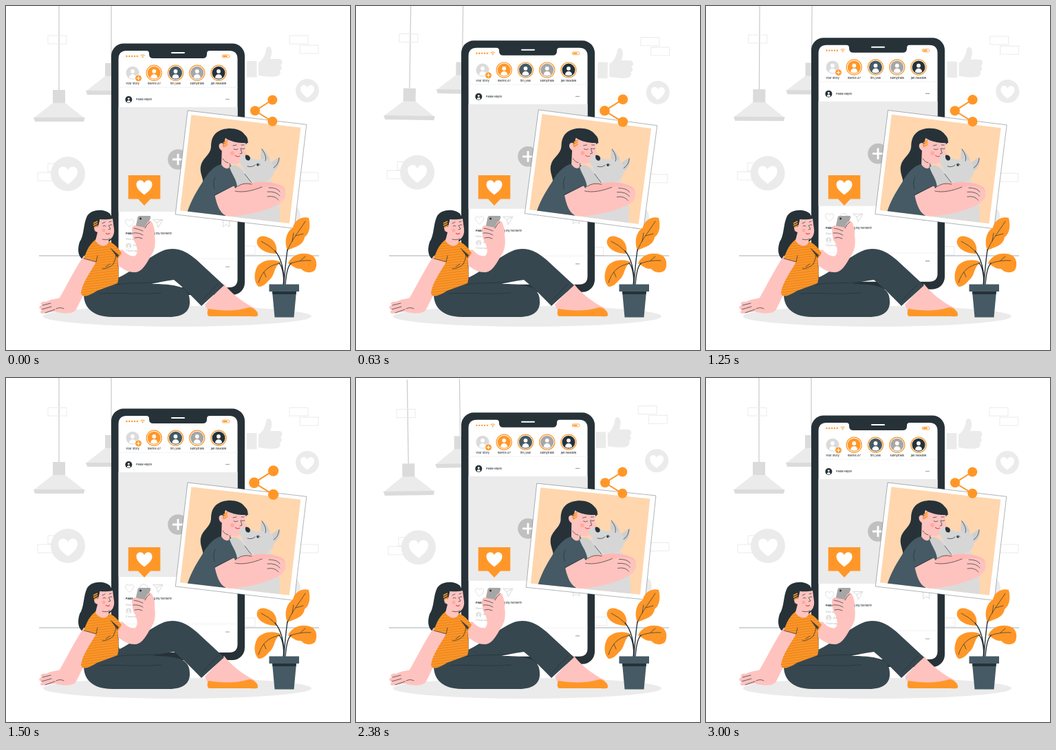
These frames come from a looping animation (500x500 px, 3040 ms). An HTML page:

```html
<!DOCTYPE html>
<html lang="en">
<head>
<meta charset="utf-8">
<title>Sharing a photo</title>
<style>
html, body { margin: 0; width: 100%; height: 100%; overflow: hidden; background: #fff; }
svg { display: block; width: 100%; height: 100%; }
text { font: 500 3.9px Inter, Roboto, sans-serif; fill: #263238; }
.line { fill: none; stroke: #263238; stroke-width: .7; stroke-linecap: round; stroke-linejoin: round; }
.dark { fill: #263238; }
.slate { fill: #455a64; }
.pants { fill: #37474f; }
.orange { fill: #ff9728; }
.skin { fill: #ffc3bf; }
.pale { fill: #ebebeb; }
.white { fill: #fff; }
</style>
</head>
<body>
<svg viewBox="0 0 500 500">
<defs>
  <path id="heart" d="M0 .95C-.4 .65-1 .2-1-.35C-1-.7-.78-.9-.5-.9C-.25-.9-.08-.75 0-.52C.08-.75 .25-.9 .5-.9C.78-.9 1-.7 1-.35C1 .2 .4 .65 0 .95Z"/>
  <g id="person"><circle cy="-2.3" r="2.9"/><path d="M-4.900 7C-5.200 .2 5.200 .2 4.900 7C2.800 8.700-2.800 8.700-4.900 7Z"/></g>
  <g id="dots" class="dark"><circle cx="-2" r=".6"/><circle r=".6"/><circle cx="2" r=".6"/></g>
  <g id="lamp">
    <path d="M-9 0H9V20H-9Z" fill="#dbdbdb"/>
    <path d="M-9 19H9L37 41H-37Z" class="pale"/>
    <path d="M-37 40H37.500L36 46H-35Z" fill="#dbdbdb"/>
  </g>
  <path id="shirt" d="M132 338C124 344 120 350 117 357L113 367L131 372C122 388 111 402 109 417C110 426 123 420 132 414L162 403C166 391 161 376 163 367L168 359C163 351 156 344 149 342Z"/>
  <pattern id="stripes" width="20" height="3.6" patternUnits="userSpaceOnUse" patternTransform="rotate(-7)">
    <path d="M0 1.800H20" stroke="#b56613" stroke-width=".5"/>
  </pattern>
  <clipPath id="picture"><path d="M6 5.500H166V145.500H6Z" transform="translate(264 152) rotate(6.7)"/></clipPath>
</defs>

<g id="backdrop">
  <path d="M77 0V122M153 0V83" stroke="#c9c9c9" stroke-width="1.2"/>
  <use href="#lamp" x="77" y="122"/>
  <use href="#lamp" x="153" y="83"/>
  <path fill="none" stroke="#ebebeb" d="M61 43h27v12h-27zM61 229h22v12h-22zM46 242h22v12h-22zM412 43h27v12h-27zM427 57h27v12h-27zM426 242h28v12h-28zM340 349h22v12h-22z"/>
  <path class="pale" d="M350 80H364.500V103.500H350ZM367 82C373 79 377 71 378 63C379 57 385 58 386 64C387 69 385 74 384 77H397C402 77 403 84 399 86C402 89 401 93 398 94C400 97 398 101 394 102C386 104 374 102 367 101Z"/>
  <g class="pale"><circle cx="90" cy="244" r="25"/><circle cx="438" cy="123" r="17"/><circle cx="411" cy="305" r="17"/></g>
  <g class="white">
    <use href="#heart" transform="translate(90 246) scale(14)"/>
    <use href="#heart" transform="translate(438 124) scale(10)"/>
  </g>
</g>
<path d="M48 363H455" stroke="#455a64" stroke-width=".5"/>
<ellipse class="pale" cx="249" cy="451" rx="195" ry="15"/>

<g id="phone">
  <rect class="dark" x="153" y="54.500" width="194" height="365.500" rx="18"/>
  <path class="white" d="M175.500 65H204Q208 65 208 69V70Q208 76 214 76H286Q292 76 292 70V69Q292 65 296 65H324.500Q336.500 65 336.500 77V397Q336.500 409 324.500 409H175.500Q163.500 409 163.500 397V77Q163.500 65 175.500 65Z"/>
  <path d="M241 68H259" stroke="#fff" stroke-width="2" stroke-linecap="round"/>
  <path d="M175.500 73H192" stroke="#ff9728" stroke-width="2.4" stroke-linecap="round" stroke-dasharray="0 3.8"/>
  <path d="M195.500 72Q198.700 69.500 202 72M197 73.400Q198.700 72 200.500 73.400" fill="none" stroke="#ff9728" stroke-width=".9"/>
  <circle class="orange" cx="198.700" cy="74.800" r=".8"/>
  <rect x="314.500" y="71" width="10" height="4" rx="1" fill="none" stroke="#ff9728" stroke-width=".8"/>
  <path class="orange" d="M315.500 72h6v2h-6z"/>
  <g id="stories" text-anchor="middle"></g>
  <circle class="orange" cx="192.500" cy="105" r="4.8" stroke="#fff" stroke-width=".7"/>
  <path d="M189.800 105h5.400M192.500 102.300v5.400" stroke="#fff" stroke-width="1.1"/>
  <path d="M163.500 118.300H336.500M163.500 367.500H336.500" stroke="#ebebeb" stroke-width=".6"/>
  <circle class="dark" cx="178.300" cy="136" r="5"/>
  <use href="#person" class="white" transform="translate(178.300 136) scale(.5)"/>
  <text x="189" y="137.400">Paula Hayes</text>
  <use href="#dots" x="322" y="135.500"/>
  <path class="pale" d="M163.500 147H336.500V299H163.500Z"/>
  <circle cx="250" cy="223" r="14.8" fill="#c0c0c0"/>
  <path d="M242 223h16M250 215v16" stroke="#fff" stroke-width="2.8"/>
  <g fill="none" stroke="#dadada">
    <use href="#heart" transform="translate(179.500 315.500) scale(6)" stroke-width=".15"/>
    <path d="M195 320C192 314 197 309 201 310C207 311 208 319 202 321L194.500 321.500ZM213.500 310.500H228L221 322L219 314.500ZM219 314.500L228 310.500M315.500 310H324.500V321L320 317.500L315.500 321Z"/>
  </g>
  <text x="174" y="332.300" style="font-weight:700">Paula</text>
  <text x="241" y="332.300" text-anchor="end">Enjoying my moment!</text>
  <g opacity=".35">
    <text x="174" y="340.500" style="font-size:3.5px">View all notes</text>
    <text x="185" y="349.500" style="font-size:3.5px">Add a comment</text>
    <text x="174" y="357.500" style="font-size:3.2px">2 hours ago</text>
  </g>
  <circle cx="178.300" cy="348.500" r="4" fill="#e0e0e0"/>
  <use href="#person" class="white" transform="translate(178.300 348.500) scale(.4)"/>
  <use href="#dots" x="322" y="379"/>
</g>

<path class="orange" d="M177.700 246H224.300V280.500H210L201 290L192 280.500H177.700Z"/>
<use href="#heart" class="white" transform="translate(201 263.500) scale(11.5)"/>

<g id="photo">
  <rect width="174" height="152" transform="translate(264 152) rotate(6.7)" fill="#fff" stroke="#263238" stroke-width=".35"/>
  <g clip-path="url(#picture)">
    <path fill="#ffd6ae" d="M240 145H445V330H240Z"/>
    <!-- dog body and far ear -->
    <path fill="#dbdbdb" d="M336 233C350 235 356 250 384 252C398 266 400 300 396 330H330Z"/>
    <path fill="#cfcfcf" d="M371 206C377 212 383 216 384 228L370 224ZM398 219C399 230 394 239 386 241L383 229Z"/>
    <!-- hair and torso -->
    <path class="dark" d="M306 184C317 175 340 176 347 187C352 191 353 198 349 201L331 200L327 224C328 235 316 238 308 244C300 250 296 259 285 262C290 254 281 245 283 233C285 221 297 217 298 205C298 196 300 189 306 184Z"/>
    <path class="slate" d="M314 230C303 231 292 244 285 257C276 271 267 286 262 305L315 312L345 260C342 248 334 234 324 230Z"/>
    <path class="skin" d="M314 203L313 230C317 238 327 239 325 229C333 231 341 229 344 224C346 220 346 218 350 215L347 207C349 202 349 197 348 193C336 197 326 195 320 190Z"/>
    <path class="dark" d="M315 187C319 196 337 200 352 199C350 186 340 179 325 180Z"/>
    <path class="dark" d="M314 185C321 192 318 204 312 208C303 203 303 189 314 185Z"/>
    <path class="skin" d="M316 200C308 196 307 208 315 211Z"/>
    <path d="M316 199L322 195M315 202L322 198M316 205L322 201" stroke="#ff9728" stroke-width="1.8"/>
    <path class="line" d="M331 208Q334 210 337 208M342 207Q344 209 347 207M330 203L335 202M342 202L346 202M341 207L343 214L340 215M323 228Q318 227 315 222"/>
    <path d="M333 217Q336 220 340 218" fill="none" stroke="#e75656" stroke-width="1.2"/>
    <circle cx="329" cy="214" r="3" fill="#ff9a8f" opacity=".6"/>
    <!-- dog head and paw -->
    <path fill="#d6d6d6" d="M338 224C340 218 347 215 352 218C359 223 366 224 373 222C384 222 393 231 389 243C386 253 374 258 363 257C354 254 347 239 338 224Z"/>
    <path fill="#cfcfcf" d="M325 235C329 228 339 231 347 244L357 257L336 262C334 250 329 246 325 235Z"/>
    <path class="dark" d="M348 217C352 215 357 220 354 224C350 226 347 222 348 217Z"/>
    <path class="line" d="M364 230Q367 227 369 231M372 208Q380 219 377 225M397 221Q396 231 389 235M351 233Q358 235 362 231M347 244L357 257"/>
    <circle class="dark" cx="366" cy="231" r="1.6"/>
    <!-- arms -->
    <path fill="#ffb8b4" d="M333 266C339 257 351 256 360 257C377 254 394 257 403 263C408 268 407 276 401 283L340 285Z"/>
    <path class="skin" d="M303 272L328 257C332 262 334 268 340 270C352 270 367 264 382 262C393 260 405 264 406 271C409 279 400 287 392 290C375 299 349 304 327 306C312 307 306 289 303 272Z"/>
    <path class="slate" d="M304 249C299 259 301 268 303 276L331 261C327 251 319 243 311 243Z"/>
    <path class="line" d="M333 269C344 272 360 268 372 263M382 264Q395 264 398 270M380 270Q393 269 398 276M380 277Q391 275 396 282M337 262Q345 256 357 259M303 275L331 261M304 249Q300 257 303 266"/>
  </g>
</g>

<g id="share">
  <path d="M387 136.500L362 152.300L387 167.800" fill="none" stroke="#ff9728" stroke-width="2"/>
  <g class="orange"><circle cx="387.300" cy="136.500" r="7"/><circle cx="362" cy="152.300" r="7"/><circle cx="387.300" cy="167.800" r="7"/></g>
</g>

<g id="plant">
  <g class="orange">
    <path d="M409 355C404 343 407 328 417 322C419 311 431 305 440 308C443 320 441 331 434 336C432 348 421 350 409 355Z"/>
    <path d="M393 360C382 360 369 356 365 346C363 336 371 332 380 336C390 339 395 348 393 360Z"/>
    <path d="M410 374C416 360 432 357 444 362C452 366 453 377 449 384C443 389 434 388 429 382C421 383 416 377 410 374Z"/>
    <path d="M400 373C391 367 373 368 365 379C360 389 360 401 367 408C376 408 379 401 384 397C391 391 390 376 400 373Z"/>
  </g>
  <path class="line" style="stroke-width:1.4" d="M404 405C405 388 407 369 409 354M404 405C405 386 400 366 391 356M403 405C405 393 401 377 397 374M406 405C407 391 409 379 414 374"/>
  <path class="line" d="M409 356C414 341 425 329 435 313M416 342L418 330M421 334L432 331M392 357Q382 347 371 342M414 374Q428 369 443 370M428 370L435 364M398 374C381 377 372 386 367 402M375 387L378 394"/>
  <path class="slate" d="M382.500 404.500H426V415H422L418.500 452.500H390.500L387 415H382.500Z"/>
  <path class="dark" d="M387 415H422L421.500 419H387.500Z"/>
</g>

<g id="woman">
  <path class="dark" d="M118 305C124 295 143 294 151 302L155 310L137 316L133 337C129 350 121 353 118 358L111 368C104 363 104 352 107 343C114 333 112 317 118 305Z"/>
  <path class="dark" d="M152 331L153 340L148 344Z"/>
  <!-- supporting arm -->
  <path class="skin" d="M113 363L132 369C126 394 112 421 102 441C98 448 84 448 71 444L53 447C49 447 49 443 53 442L49 440C47 437 50 435 53 435L51 434C49 431 54 429 58 430C65 426 73 426 78 424C88 407 99 384 113 363Z"/>
  <path class="line" d="M53 435L65 432M52 441L66 437M57 446L71 441M73 440Q79 437 84 440"/>
  <!-- foot -->
  <path class="skin" d="M289 434L317 404C325 415 342 430 363 440L340 446L294 445Z"/>
  <path class="orange" d="M294 440C312 443 334 444 354 438C361 439 367 444 366 450C365 452 358 451 354 451H296C292 451 292 445 294 440Z"/>
  <!-- legs, with a gap left under the knee -->
  <path class="pants" d="M114 411C110 431 119 452 155 452H237C258 452 268 443 267 429C267 420 264 415 257 410C249 406 232 404 215 404L160 400Z"/>
  <path class="pants" d="M158 397C178 390 202 369 221 359C228 355 234 353 241 353C257 353 266 360 277 369L317 406L284 436C270 422 259 410 244 398C230 400 218 402 207 405L159 408C145 412 124 415 113 417Z"/>
  <path class="line" d="M136 418C165 416 191 420 225 417M160 405C180 401 200 404 222 401M286 427L308 404"/>
  <!-- raised arm -->
  <path class="skin" d="M161 357L169 354C176 361 182 365 188 363C193 358 190 350 188 344L184 328C184 321 188 318 193 319L208 316C215 319 217 325 216 333C218 347 216 356 210 364C205 373 198 386 189 387C178 388 170 382 163 377Z"/>
  <use href="#shirt" class="orange"/>
  <use href="#shirt" fill="url(#stripes)"/>
  <path class="line" d="M113 367L131 372L133 363M140 382Q149 382 156 375M156 375Q160 367 160 361M145 379L151 375"/>
  <path class="dark" d="M151 351L164 362L162 366Z" opacity=".85"/>
  <!-- head -->
  <path class="skin" d="M134 320C129 315 125 322 129 327L133 329L130 341C136 352 151 350 149 340C155 338 158 331 157 324L155 309C148 310 141 310 137 307Z"/>
  <path class="dark" d="M124 303C132 296 145 297 151 302L155 309C146 311 140 310 136 310C135 318 133 323 130 327C122 323 119 310 124 303Z"/>
  <path class="skin" d="M133 321C129 317 126 323 130 327L134 328Z"/>
  <path d="M127 316L133 313M127 319L133 316M128 322L134 319" stroke="#ff9728" stroke-width="1.7"/>
  <path class="line" d="M140 316L144 314M150 314L153 313M141 320Q143 318 145 320M150 319Q152 317 154 318M149 319L152 324L149 325M140 339Q147 341 151 338"/>
  <path d="M145 330Q148 333 151 330" fill="none" stroke="#e75656" stroke-width="1.3"/>
  <circle cx="142" cy="326" r="2.6" fill="#ff9a8f" opacity=".6"/>
  <!-- handset and fingers -->
  <path fill="#a6a6a6" d="M194 305H208.500Q211 305 210 308L204 324Q203 326 200 326H189Q187 326 188 323L191.500 307Q192 305 194 305Z"/>
  <circle class="dark" cx="195.500" cy="309" r="1.5"/>
  <path class="skin" d="M183 325C183 319 188 318 191 320L202 322C204 315 208 310 212 314C215 319 217 329 215 337L211 349L190 346C184 341 184 334 183 325Z"/>
  <path class="line" d="M186 323Q193 324 199 327M185 330Q193 329 199 333M187 337Q193 335 198 338M202 323Q205 316 209 314"/>
</g>
</svg>
<script>
const $ = id => document.getElementById(id);
const PERIOD = 3000, LOOP = 3040;

const stories = [
  ["Your Story", "#dbdbdb"], ["marnie.47", "#ff9728"], ["tim_vale", "#455a64"],
  ["sunnytrails", "#a6a6a6"], ["jan.meadow", "#263238"]
];
$("stories").innerHTML = stories.map(([name, color], i) => {
  const x = 184 + 31.25 * i;
  const ring = i ? `<circle cx="${x}" cy="97.3" r="11.1" fill="#fff" stroke="#ff9728" stroke-width="1.2"/>` : "";
  return `${ring}<circle cx="${x}" cy="97.3" r="9.5" fill="${color}"/>
    <use href="#person" class="white" x="${x}" y="97.3"/>
    <text x="${x}" y="114.4">${name}</text>`;
}).join("");

// Linear interpolation through [phase, value] stops.
function track(p, stops) {
  const i = Math.max(1, stops.findIndex(([at]) => at >= p));
  const [a, from] = stops[i - 1], [b, to] = stops[i];
  return from + (to - from) * (p - a) / (b - a);
}
const floating = [[0, 0], [.5, -10], [1, 0]];
const sway = [[0, 0], [.25, 1], [.75, -1], [1, 0]];
const beat = [[0, 1], [.1, 1.1], [.3, 1], [.4, 1], [.5, 1.1], [.6, 1], [1, 1]];
const move = (id, value) => $(id).setAttribute("transform", value);

function draw(now) {
  const p = Math.min(1, now % LOOP / PERIOD);
  const angle = track(p, sway);
  move("phone", `translate(0 ${track(p, floating)})`);
  move("backdrop", `rotate(${angle} 247 181)`);
  move("photo", `rotate(${angle} 341.5 237.5)`);
  move("share", `translate(374.5 152.2) scale(${track(p, beat)}) translate(-374.5 -152.2)`);
  requestAnimationFrame(draw);
}
draw(performance.now());
</script>
</body>
</html>
```
